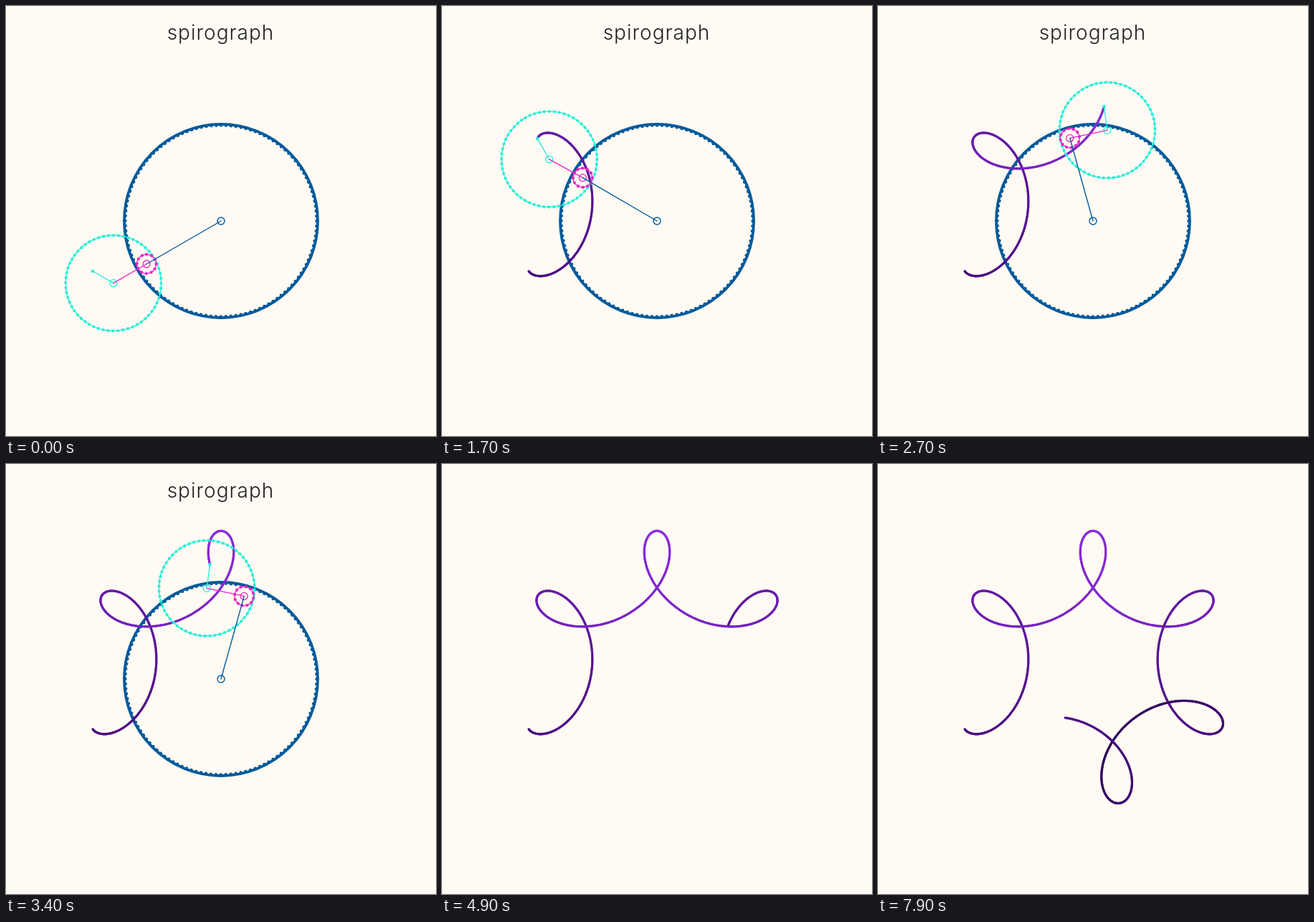
An HTML page with a canvas for the animation above (8 s loop, 600x600 px).

```html
<!DOCTYPE html>
<html lang="en">
<head>
<meta charset="utf-8">
<title>spirograph</title>
<style>
  html, body { margin: 0; width: 100%; height: 100%; overflow: hidden; background: #fffaf3; }
  canvas { display: block; }
</style>
</head>
<body>
<canvas width="600" height="600"></canvas>
<script>
const ctx = document.querySelector('canvas').getContext('2d');
const LOOP = 8000, STEP = 100, TAU = Math.PI * 2, RAD = Math.PI / 180;
const BLUE = '#005a9b', PINK = '#ec25c5', CYAN = '#27efd7';
const RING = 400 / 3, PINION = RING / 10, WHEEL = RING / 2;
const TOOTH = TAU * RING / 120;
const START = -120;

// Crank angle in degrees from the top, as [seconds, angle]
const KEYS = [[.66, -105.4], [1, -90.4], [1.7, -59.8], [2.7, -15.6], [3.4, 15.6], [4.9, 82.1], [7.9, 216]];

function crankAt(t) {
  const [t0, u0] = KEYS[0];
  if (t < t0) return START + (u0 - START) * (t / t0) ** 2;
  let i = 1;
  while (i < KEYS.length - 1 && t > KEYS[i][0]) i++;
  const [ta, a] = KEYS[i - 1], [tb, b] = KEYS[i];
  return a + (b - a) * (t - ta) / (tb - ta);
}

function arm([x, y], length, degrees) {
  const a = (degrees - 90) * RAD;
  return [x + length * Math.cos(a), y + length * Math.sin(a)];
}

function pose(u) {
  const hub = [300, 300];
  const pinion = arm(hub, RING - PINION, u);
  const wheel = arm(pinion, WHEEL - PINION, -5 * u);
  return { hub, pinion, wheel, pen: arm(wheel, RING / 4, u / 2) };
}

function line(from, to, color, width) {
  ctx.strokeStyle = color;
  ctx.lineWidth = width;
  ctx.beginPath();
  ctx.moveTo(...from);
  ctx.lineTo(...to);
  ctx.stroke();
}

function circle([x, y], r, color, width, turn = 0) {
  ctx.strokeStyle = color;
  ctx.lineWidth = width;
  ctx.beginPath();
  ctx.arc(x, y, r, turn, turn + TAU);
  ctx.stroke();
}

function teeth(center, r, color, turn) {
  ctx.setLineDash([0, TOOTH]);
  circle(center, r, color, 4.2, (turn - 90) * RAD);
  ctx.setLineDash([]);
}

function gear(center, r, color, turn) {
  circle(center, r, color, 1.4);
  teeth(center, r, color, turn);
  circle(center, 5, color, 1.3);
}

// Bright at the top, darkest 160 degrees later
function inkAt(u) {
  const phase = Math.abs(((u + 480) % 320) - 160) / 160;
  const k = 1 - phase;
  const mix = (a, b) => Math.round(b + (a - b) * (1 - k));
  return `rgb(${mix(45, 142)},${mix(0, 46)},${mix(86, 226)})`;
}

function trace(end) {
  let last = pose(START).pen;
  for (let u = START; u < end;) {
    u = Math.min(u + .5, end);
    const next = pose(u).pen;
    line(last, next, inkAt(u), 3.2);
    last = next;
  }
}

function draw(ms) {
  const u = crankAt(ms / 1000);
  const { hub, pinion, wheel, pen } = pose(u);
  const alpha = Math.max(0, Math.min(1, (4000 - ms) / 400));
  ctx.globalAlpha = 1;
  ctx.fillStyle = '#fffaf3';
  ctx.fillRect(0, 0, 600, 600);
  ctx.lineCap = 'round';

  ctx.globalAlpha = alpha;
  circle(hub, 135, BLUE, 3.8);
  teeth(hub, RING, BLUE, 0);

  ctx.globalAlpha = 1;
  trace(u);

  ctx.globalAlpha = alpha;
  gear(wheel, WHEEL, CYAN, u / 2);
  line(wheel, pen, CYAN, 1.4);
  line(pen, pen, CYAN, 4.6);
  gear(pinion, PINION, PINK, -9 * u);
  line(pinion, wheel, PINK, 1.4);
  line(hub, pinion, BLUE, 1.4);
  circle(hub, 5, BLUE, 1.4);

  ctx.fillStyle = '#222';
  ctx.font = '300 28px Inter, Lato, sans-serif';
  ctx.letterSpacing = '1px';
  ctx.textAlign = 'center';
  ctx.fillText('spirograph', 299.5, 47);
}

const begin = performance.now();
function tick() {
  const ms = (performance.now() - begin) % LOOP;
  draw(Math.floor(ms / STEP) * STEP);
  requestAnimationFrame(tick);
}
tick();
</script>
</body>
</html>
```
